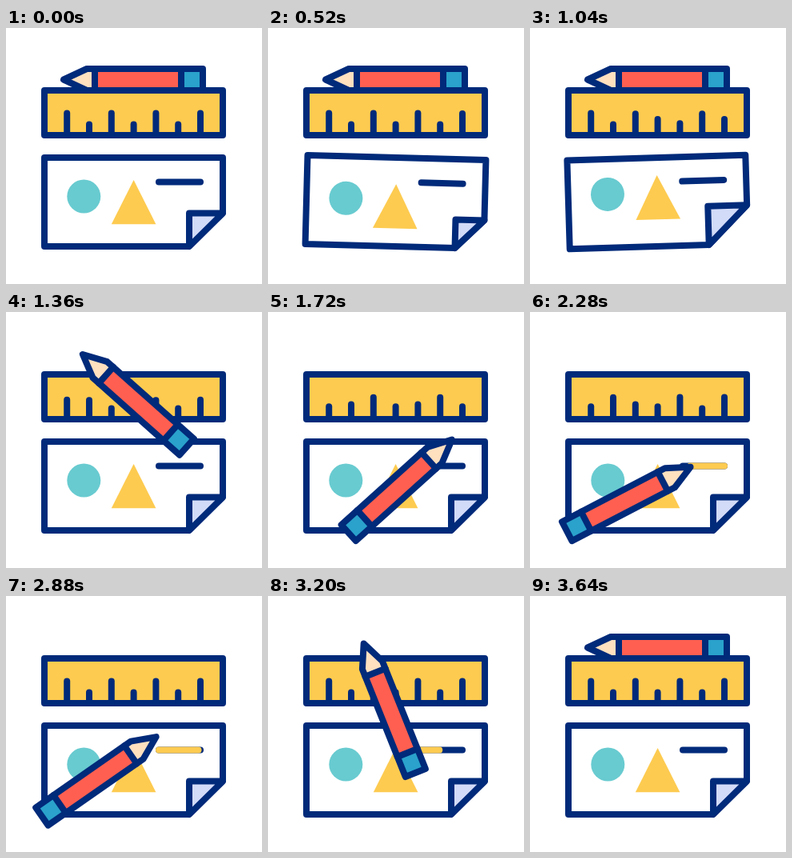
An HTML page with a canvas for the animation above (4 s loop, 320x320 px).

```html
<!DOCTYPE html>
<html lang="en">
<head>
<meta charset="utf-8">
<title>Drawing tools</title>
<style>
html, body { margin: 0; width: 100%; height: 100%; overflow: hidden; background: #fff; }
canvas { display: block; width: 100vmin; height: 100vmin; }
</style>
</head>
<body>
<canvas id="stage"></canvas>
<script>
const LOOP = 4000;
const NAVY = '#002a7a', YELLOW = '#fdcb50', RED = '#ff5f50', BLUE = '#2aa2cb';
const WOOD = '#ffe0bf', TEAL = '#68cbd0', FOLD = '#d2dbf8';
const SWAY = [[0, 0], [260, -3.6], [640, 3], [980, -2.5], [1140, 0]];

const canvas = document.getElementById('stage');
const ctx = canvas.getContext('2d');

const rad = deg => deg * Math.PI / 180;
const mix = (a, b, k) => a + (b - a) * k;
const ease = k => (1 - Math.cos(Math.PI * k)) / 2;
const progress = (t, start, duration) =>
  ease(Math.min(1, Math.max(0, (t - start) / duration)));

function resize() {
  const size = Math.min(innerWidth, innerHeight) * devicePixelRatio;
  canvas.width = canvas.height = Math.round(size);
}

function shape(points, fill, stroke) {
  ctx.beginPath();
  points.forEach(([x, y]) => ctx.lineTo(x, y));
  ctx.closePath();
  if (fill) { ctx.fillStyle = fill; ctx.fill(); }
  if (stroke) { ctx.strokeStyle = stroke; ctx.stroke(); }
}

function line(x1, y1, x2, y2, color) {
  ctx.beginPath();
  ctx.moveTo(x1, y1);
  ctx.lineTo(x2, y2);
  ctx.strokeStyle = color;
  ctx.stroke();
}

function box(x1, y1, x2, y2) {
  return [[x1, y1], [x2, y1], [x2, y2], [x1, y2]];
}

function swayAngle(t) {
  for (let i = 1; i < SWAY.length; i++) {
    const [t0, a] = SWAY[i - 1], [t1, b] = SWAY[i];
    if (t < t1) return mix(a, b, progress(t, t0, t1 - t0));
  }
  return 0;
}

function drawPaper(t, drawn, cleared) {
  const angle = swayAngle(t);
  const fold = 42 - 4 * angle;
  const fx = 271 - fold, fy = 273.5 - fold;

  ctx.save();
  ctx.translate(159.5, 217.5);
  ctx.rotate(rad(angle));
  ctx.translate(-159.5, -217.5);

  shape([[48, 162], [271, 162], [271, fy], [fx, 273], [48, 273]], '#fff', NAVY);
  shape([[fx, fy], [271, fy], [fx, 273]], FOLD, NAVY);

  ctx.beginPath();
  ctx.arc(97.3, 210.5 + 2.6 * angle, 21, 0, 2 * Math.PI);
  ctx.fillStyle = TEAL;
  ctx.fill();

  const dy = 3.5 * angle;
  shape([[159.6, 190 + dy], [187.4, 245.3 + dy], [131.8, 245.3 + dy]], YELLOW);

  line(191, 192.5, 243, 192.5, NAVY);
  const left = 243 - 52 * drawn, right = 243 - 52 * cleared;
  if (right - left > 0.2) line(left, 192.5, right, 192.5, YELLOW);
  ctx.restore();
}

// Two waves run through the ticks from right to left.
function drawRuler(t) {
  const period = 760;
  shape(box(48, 78, 271, 134), YELLOW, NAVY);
  for (let i = 0; i < 7; i++) {
    const phase = (t - 480) / period - (6 - i) / 6;
    const swap = phase > 0 && phase < 2 ? ease(2 * phase) : 0;
    const long = i % 2 ? swap : 1 - swap;
    const x = 76.2 + 27.8 * i;
    line(x, 134, x, mix(120.5, 106.5, long), NAVY);
  }
}

function drawPencil(arrive, drawn, leave) {
  let x = mix(159, 166, arrive) - 52 * drawn;
  x = mix(x, 159, leave) + 16 * Math.sin(Math.PI * leave * leave);
  const y = mix(64.5, 234, arrive - leave);

  ctx.save();
  ctx.translate(x, y);
  ctx.rotate(rad(152.5 * (arrive - leave)));
  const outline = [[-87, 0], [-58, -13.5], [87, -13.5], [87, 13.5], [-58, 13.5]];
  shape(outline, WOOD);
  shape(box(-48, -13.5, 60, 13.5), RED);
  shape(box(60, -13.5, 87, 13.5), BLUE);
  line(-48, -13.5, -48, 13.5, NAVY);
  line(60, -13.5, 60, 13.5, NAVY);
  shape(outline, null, NAVY);
  ctx.restore();
}

function render(now) {
  const t = now % LOOP;
  const arrive = progress(t, 1080, 800);
  const drawn = progress(t, 1880, 555);
  const leave = progress(t, 2765, 815);

  const scale = canvas.width / 320;
  ctx.setTransform(scale, 0, 0, scale, 0, 0);
  ctx.fillStyle = '#fff';
  ctx.fillRect(0, 0, 320, 320);
  ctx.lineWidth = 8;
  ctx.lineCap = ctx.lineJoin = 'round';

  drawPaper(t, drawn, leave);
  drawRuler(t);
  drawPencil(arrive, drawn, leave);
}

let start;
function tick(now) {
  start ??= now;
  render(now - start);
  requestAnimationFrame(tick);
}

addEventListener('resize', resize);
resize();
render(0);
requestAnimationFrame(tick);
</script>
</body>
</html>
```
